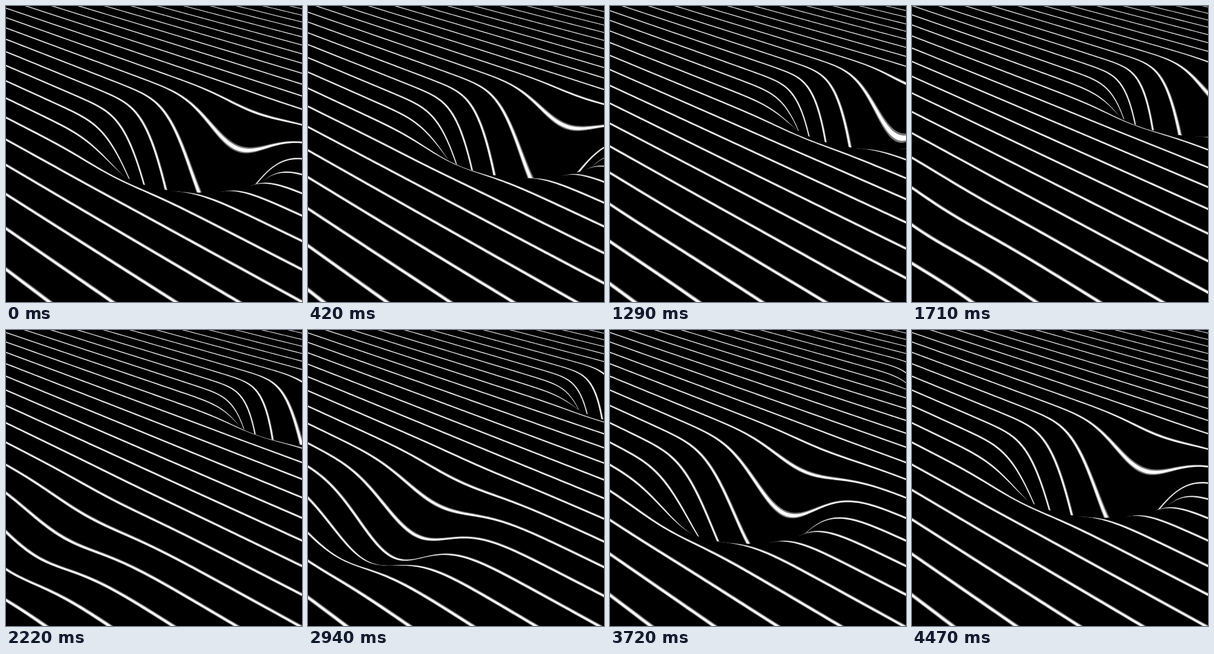
Write an HTML page with a canvas that moves like this. It is 500x500 px and loops after 4500 ms.

```html
<!DOCTYPE html>
<html>
<head>
<meta charset="utf-8">
<style>
  html, body { margin: 0; width: 100%; height: 100%; overflow: hidden; background: #000; }
  canvas { display: block; width: 500px; height: 500px; }
</style>
</head>
<body>
<canvas id="stage" width="500" height="500"></canvas>
<script>
const ctx = document.getElementById('stage').getContext('2d');
const LOOP = 4500, TICK = 30;

// Camera: all lines on the ground meet at a point up left on the horizon.
const CENTER = 250, SIDE = 1315, RISE = 608;
const TILT_COS = 0.8867, TILT_PER_FOCAL = 0.000397;
const FIRST = -4, LAST = 26;

// Line profile, in units of the line spacing.
const SOFT = 0.056, CORE = 0.032, SLICES = 12;

const slope = k => 1.3266 + 0.1244 * k;

// A round well that crosses the lines, narrowing as it deepens and then fades.
const makeWell = t => ({
  k: 8.65 + 3 * t,
  v: 17.4,
  depth: 1.08 * Math.exp(-0.18 * (t - 1.8) ** 2),
  falloff: 0.295 + 0.04 * t
});

function depthAt(k, v, wells) {
  let depth = 0;
  for (const well of wells) {
    const r2 = (k - well.k) ** 2 + (v - well.v) ** 2;
    if (r2 < 40) depth += well.depth * Math.exp(-well.falloff * r2);
  }
  return depth;
}

// Screen points of the curve at line position k.
function edge(k, wells) {
  const m = slope(k), points = [];
  for (let x = -60; x <= 660; x += 5) {
    const w = m / (x - CENTER + SIDE);
    const d = depthAt(k, 21146 * w - 8.037 * m, wells);
    const q = w + TILT_PER_FOCAL * d;
    points.push([
      CENTER + (m - SIDE * w) / q,
      CENTER + (1 - RISE * w + TILT_COS * d) / q
    ]);
  }
  return points;
}

function fillBetween(far, near, color) {
  ctx.fillStyle = color;
  ctx.beginPath();
  for (const [x, y] of far) ctx.lineTo(x, y);
  for (let i = near.length - 1; i >= 0; i--) ctx.lineTo(near[i][0], near[i][1]);
  ctx.fill();
}

function draw(t) {
  const wells = [makeWell(t), makeWell(t - LOOP / 1000)];
  const shift = (t * 4 / 3) % 1;
  const gap = (1 - 2 * SOFT) / SLICES;
  ctx.fillStyle = '#000';
  ctx.fillRect(0, 0, 500, 500);
  ctx.strokeStyle = '#777';
  ctx.lineWidth = 0.6;

  // Far to near, so that the front rim hides the wall behind it.
  for (let n = LAST; n >= FIRST; n--) {
    const k = n + shift;
    const at = offset => edge(k + offset, wells);
    const slices = [];
    for (let i = 0; i <= SLICES + 1; i++) slices.push(at(-SOFT - i * gap));
    fillBetween(at(SOFT), slices[0], '#777');
    ctx.stroke();
    fillBetween(at(CORE), at(-CORE), '#fff');
    // Slices overlap by one to leave no seams.
    for (let i = 0; i < SLICES; i++) fillBetween(slices[i], slices[i + 2], '#000');
  }
}

let shown = -1;
function frame() {
  const tick = Math.floor((performance.now() % LOOP) / TICK);
  if (tick !== shown) {
    shown = tick;
    draw(tick * TICK / 1000);
  }
  requestAnimationFrame(frame);
}
frame();
</script>
</body>
</html>
```
